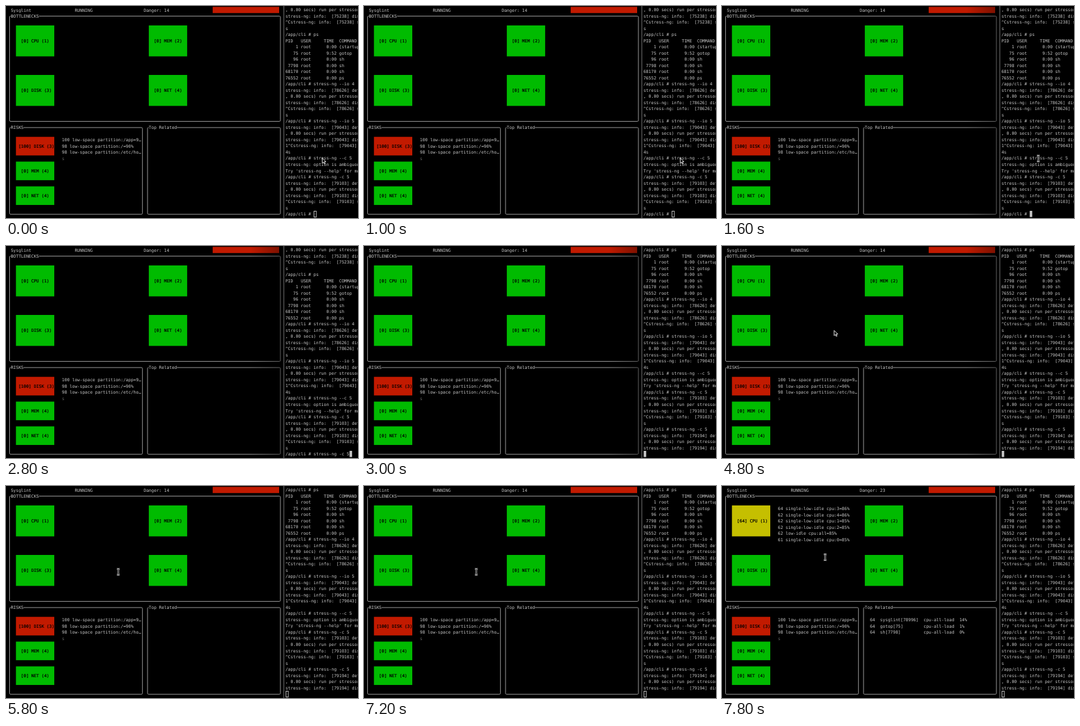
These frames come from a looping animation (540 by 326 pixels, 8 s). An HTML page with a canvas:

```html
<!DOCTYPE html>
<html lang="en">
<head>
<meta charset="utf-8">
<title>Terminal monitor</title>
<style>
  html, body { margin: 0; width: 100%; height: 100%; overflow: hidden; background: #000; }
  canvas { display: block; width: 540px; height: 326px; }
</style>
</head>
<body>
<canvas id="stage" width="540" height="326"></canvas>
<script>
const ctx = document.getElementById('stage').getContext('2d');
const LOOP = 8000, STEP = 200;
const CW = 3.92, RH = 9.52;                 // character grid
const LEFT = { x: 3.5, y: 1.3 };            // origin of each pane
const SHELL = { x: 428.7, y: 0.8 };
const GREEN = '#00bb00', RED = '#c21a00', YELLOW = '#c5bf00';
const TEXT = '#c8c8c8', LINE = '#989898', INK = '#000';

const rowY = r => LEFT.y + r * RH;
const colX = c => LEFT.x + c * CW;

const run = (pid, tail) => [
  `stress-ng: info:  [${pid}] defaulting`,
  ', 0.00 secs) run per stressor',
  `stress-ng: info:  [${pid}] dispatching`,
  ...tail
];
const stop = pid => [`^Cstress-ng: info:  [${pid}] successful`, 's'];
const prompt = cmd => '/app/cli # ' + cmd;

const history = [
  ...run(75238, stop(75238)).slice(1),
  prompt('ps'),
  'PID   USER     TIME  COMMAND',
  '    1 root      0:00 {startup.sh}',
  '   75 root      9:52 gotop',
  '   96 root      0:00 sh',
  ' 7798 root      0:00 sh',
  '68170 root      0:00 sh',
  '76552 root      0:00 ps',
  prompt('stress-ng --io 4'),
  ...run(78626, stop(78626)),
  prompt('stress-ng --io 5'),
  ...run(79043, ['1^Cstress-ng: info:  [79043] successful', '4s']),
  prompt('stress-ng --c 5'),
  'stress-ng: option is ambiguous',
  "Try 'stress-ng --help' for more",
  prompt('stress-ng -c 5'),
  ...run(79103, stop(79103))
];

const idle = [
  '64 single-low-idle cpu:3=86%',
  '62 single-low-idle cpu:4=86%',
  '62 single-low-idle cpu:1=85%',
  '62 single-low-idle cpu:2=85%',
  '62 low-idle cpu:all=85%',
  '61 single-low-idle cpu:0=85%'
];
const risks = [
  '100 low-space partition:/app=9…',
  '98 low-space partition:/=90%',
  '98 low-space partition:/etc/ho…'
];
const related = [
  ['sysglint[78996]', '14%'],
  ['gotop[75]', '1%'],
  ['sh[7798]', '0%']
];

function print(pane, str, col, row, color = TEXT) {
  const y = pane.y + row * RH + 7.2;
  ctx.fillStyle = ctx.strokeStyle = color;
  ctx.lineWidth = 0.2;
  [...str].forEach((ch, i) => {
    if (ch === ' ') return;
    const x = pane.x + (col + i) * CW;
    ctx.fillText(ch, x, y);
    if (color === INK) ctx.strokeText(ch, x, y);
  });
}

const put = (str, col, row, color) => print(LEFT, str, col, row, color);

function block(col, row, cols, rows, color) {
  ctx.fillStyle = color;
  ctx.fillRect(colX(col), rowY(row), cols * CW, rows * RH);
}

function tile(label, col, row, rows, color) {
  block(col, row, 15, rows, color);
  put(label, col + Math.round((15 - label.length) / 2), row + (rows - 1) / 2, INK);
}

function frame(title, c0, r0, c1, r1) {
  const x = colX(c0 + 0.5), y = rowY(r0 + 0.5);
  ctx.strokeStyle = LINE;
  ctx.lineWidth = 1;
  ctx.beginPath();
  ctx.roundRect(x, y, (c1 - c0) * CW, (r1 - r0) * RH, 1.5);
  ctx.stroke();
  ctx.fillStyle = '#000';
  ctx.fillRect(colX(c0 + 1), y - 2, title.length * CW, 4);
  put(title, c0 + 1, r0);
}

function monitor(loaded) {
  put('Sysglint', 1, 0);
  put('RUNNING', 26, 0);
  put('Danger: ' + (loaded ? 23 : 14), 53, 0);
  block(80, 0, 26, 1, RED);

  frame('BOTTLENECKS', 0, 1, 106, 18);
  tile(loaded ? '[64] CPU (1)' : '[0] CPU (1)', 3, 3, 5, loaded ? YELLOW : GREEN);
  tile('[0] MEM (2)', 55, 3, 5, GREEN);
  tile('[0] DISK (3)', 3, 11, 5, GREEN);
  tile('[0] NET (4)', 55, 11, 5, GREEN);

  frame('RISKS', 0, 19, 52, 33);
  tile('[100] DISK (3)', 3, 21, 3, RED);
  tile('[0] MEM (4)', 3, 25, 3, GREEN);
  tile('[0] NET (4)', 3, 29, 3, GREEN);
  risks.forEach((s, i) => put(s, 21, 21 + i));
  put('s', 21, 24, '#666');

  frame('Top Related', 54, 19, 106, 33);
  if (!loaded) return;
  idle.forEach((s, i) => put(s, 21, 3 + i));
  related.forEach(([name, load], i) => {
    put('64', 57, 21 + i);
    put(name, 61, 21 + i);
    put('cpu-all-load', 78, 21 + i);
    put(load, 92, 21 + i);
  });
}

// The focused shell window casts a shadow on the monitor.
function shadow() {
  const fade = ctx.createLinearGradient(375, 0, 426, 0);
  fade.addColorStop(0, 'rgba(0,0,0,0)');
  fade.addColorStop(1, 'rgba(0,0,0,0.4)');
  ctx.fillStyle = fade;
  ctx.fillRect(375, 0, 51, 326);
}

function shell(t) {
  const focused = t >= 1400 && t < 5400;
  if (focused) shadow();
  ctx.fillStyle = '#606060';
  ctx.fillRect(425.6, 0, 1.2, 326);

  const started = t >= 3000;
  const command = prompt(t >= 2000 ? 'stress-ng -c 5' : '');
  const lines = [...history, command];
  if (started) lines.push(...run(79194, ['']));
  lines.slice(-34).forEach((s, i) => print(SHELL, s, 0, i));

  const x = Math.round(SHELL.x + (started ? 0 : command.length) * CW);
  const y = Math.round(SHELL.y + 33 * RH);
  ctx.fillStyle = ctx.strokeStyle = '#bdbdbd';
  ctx.lineWidth = 1;
  if (focused) ctx.fillRect(x, y, 4, 9.5);
  else ctx.strokeRect(x + 0.5, y + 0.5, 3.5, 9);
}

function arrow(x, y) {
  const pts = [[0, 0], [0, 8], [1.9, 6.3], [3.2, 9.2], [4.5, 8.6], [3.2, 5.8], [5.6, 5.6]];
  ctx.beginPath();
  pts.forEach(([px, py]) => ctx.lineTo(x + px, y + py));
  ctx.closePath();
  ctx.fillStyle = '#000';
  ctx.fill();
  ctx.strokeStyle = '#e6e6e6';
  ctx.lineWidth = 1;
  ctx.stroke();
}

function beam(x, y) {
  ctx.beginPath();
  for (const side of [-2, 2]) {
    ctx.moveTo(x + side, y - 4.5);
    ctx.quadraticCurveTo(x, y - 4.5, x, y - 3);
    ctx.lineTo(x, y + 3);
    ctx.quadraticCurveTo(x, y + 4.5, x + side, y + 4.5);
  }
  for (const [color, width] of [['#e6e6e6', 2.4], ['#111', 0.8]]) {
    ctx.strokeStyle = color;
    ctx.lineWidth = width;
    ctx.stroke();
  }
}

function glide(t, start, end, from, to) {
  const p = Math.min(1, Math.max(0, (t - start) / (end - start)));
  const k = 1 - (1 - p) ** 2;
  return from.map((v, i) => v + (to[i] - v) * k);
}

function pointer(t) {
  if (t < 1400) arrow(485.2, 233.8);
  else if (t < 2000) beam(485.2, 234.5);
  else if (t < 4400) return;
  else if (t < 5400) arrow(...glide(t, 4400, 4800, [309, 174], [172, 129.8]));
  else beam(...glide(t, 7200, 7600, [172.2, 132], [158.2, 109.5]));
}

function draw(t) {
  ctx.fillStyle = '#000';
  ctx.fillRect(0, 0, 540, 326);
  ctx.font = '6.51px "DejaVu Sans Mono", monospace';
  ctx.textRendering = 'geometricPrecision';
  monitor(t >= 7600);
  shell(t);
  pointer(t);
}

let shown = -1;
const begin = performance.now();
function tick() {
  const t = Math.floor((performance.now() - begin) % LOOP / STEP) * STEP;
  if (t !== shown) draw(shown = t);
  requestAnimationFrame(tick);
}
tick();
</script>
</body>
</html>
```
